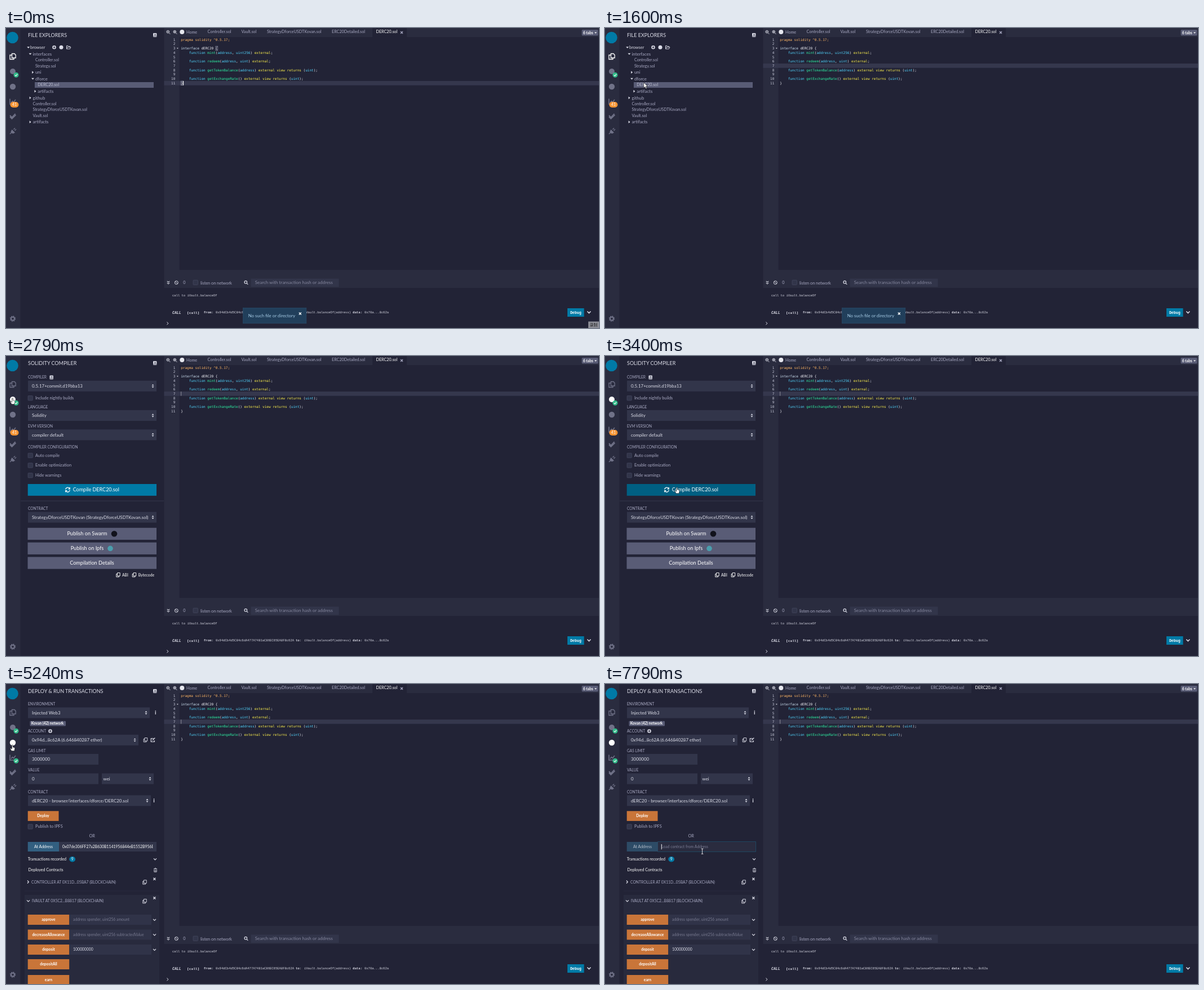
Animation of 1052 by 532 pixels, one loop 8 s. Source, as an HTML page:

```html
<!DOCTYPE html>
<html lang="en">
<head>
<meta charset="utf-8">
<title>Contract editor</title>
<style>
html, body { margin: 0; width: 100%; height: 100%; overflow: hidden; background: #222336; }
svg { display: block; width: 1052px; height: 532px; font-family: Lato, "Open Sans", sans-serif; }
text { white-space: pre; }
.mono { font-family: "Liberation Mono", "DejaVu Sans Mono", monospace; }
.code { font-family: "DejaVu Sans Mono", "Liberation Mono", monospace; }
.cjk { font-family: "Noto Sans CJK SC", "Noto Sans CJK", sans-serif; }
.tab { color: #707288; }
svg[data-tab=files] .files, svg[data-tab=compiler] .compiler, svg[data-tab=deploy] .deploy { color: #fff; }
</style>
</head>
<body>
<svg id="app" viewBox="0 0 1052 532" data-tab="files"></svg>
<script>
const BG = '#222336', BAR = '#2a2c3f', FIELD = '#32354a', GREY = '#595c76', ROW = '#35374d';
const BLUE = '#007aa6', ORANGE = '#c97539', GREEN = '#32ba89';
const TEXT = '#a8a9c2', LIGHT = '#dcdde8', WHITE = '#fff';
const LOOP = 8000;

// Markup helpers; text is placed by its vertical centre.
const box = (x, y, w, h, fill, more = '') =>
  `<rect x="${x}" y="${y}" width="${w}" height="${h}" fill="${fill}" ${more}/>`;
const dot = (x, y, r, fill, more = '') => `<circle cx="${x}" cy="${y}" r="${r}" fill="${fill}" ${more}/>`;
const txt = (x, y, s, size = 7.2, fill = TEXT, more = '') =>
  `<text x="${x}" y="${y + size * 0.35}" font-size="${size}" fill="${fill}" ${more}>${s}</text>`;
const mid = (x, y, s, size, fill = WHITE, more = '') => txt(x, y, s, size, fill, 'text-anchor="middle" ' + more);
const path = (x, y, d, stroke, fill = 'none', width = 1) =>
  `<path transform="translate(${x} ${y})" d="${d}" stroke="${stroke}" fill="${fill}" stroke-width="${width}"/>`;
const group = (id, body, hidden) => `<g id="${id}" ${hidden ? 'display="none"' : ''}>${body}</g>`;
const BOLD = 'font-weight="700"';

const line = {
  down: 'M-2.5-1.2L0 1.3L2.5-1.2', right: 'M-1-2.5L1.3 0L-1 2.5', cross: 'M-2-2L2 2M-2 2L2-2',
  check: 'M-2 0L-.5 1.6L2.2-1.5', copy: 'M-1.5-3.5H3.2V2H-1.5ZM-1.5-1.5H-3.3V3.8H1.5V2',
  plus: 'M-2 0H2M0-2V2', lens: 'M1.3 1.3L3.3 3.3M-3-.8A2.3 2.3 0 1 1 1.6-.8A2.3 2.3 0 1 1-3-.8'
};
const chevron = (x, y, way = 'down') => path(x, y, line[way], LIGHT, 'none', 1.2);
const cross = (x, y, c = LIGHT) => path(x, y, line.cross, c, 'none', 1.3);
const copy = (x, y, c = LIGHT) => path(x, y, line.copy, c, 'none', 0.9);
const fold = (x, y, open) => path(x, y, open ? 'M-2.5-1.3H2.5L0 1.5Z' : 'M-1.3-2.4V2.4L1.6 0Z', 'none', LIGHT);
const book = (x, y) => box(x - 3, y - 3.5, 6.4, 7, LIGHT, 'rx="1"') + path(x, y, 'M-1-1.5H2M-1 .1H2M-2.5 2H3', BG, 'none', 0.7);
const badge = (x, y) => dot(x, y, 4.5, GREEN) + path(x, y, line.check, WHITE, 'none', 1.1);
const plus = (x, y) => dot(x, y, 3.3, LIGHT) + path(x, y, line.plus, BG);
const tick = (x, y) => box(x, y - 4.2, 8.4, 8.4, FIELD, 'stroke="#4b4e66" stroke-width=".6" rx="1"');
const label = (y, s) => txt(39, y, s, 6.6);
const field = (x, y, w, s, h = 19, pad = 7) => box(x, y - h / 2, w, h, FIELD) + txt(x + pad, y, s, 7.9, LIGHT);
const select = (x, y, w, s, pad) => field(x, y, w, s, 19, pad) +
  path(x + w - 6.5, y, 'M-2-.8L0-3.2L2-.8ZM-2 .8L0 3.2L2 .8Z', 'none', LIGHT);
const option = (y, s) => tick(39, y) + txt(52, y - 0.3, s, 7.4);
const title = s => txt(39, 12.5, s, 9, LIGHT) + book(264, 12.5);

function sideBar() {
  const tab = (name, body) => `<g class="tab ${name}" stroke="none" fill="none">${body}</g>`;
  const cur = 'currentColor';
  return box(0, 0, 25.5, 532, BAR) + dot(11.5, 17, 10.3, BLUE) +
    tab('files', path(12, 50.5, 'M-1.5-5H3L5.2-2.7V2.5H-1.5ZM-1.5-2.5H-5V5H2V2.5', cur, 'none', 1.3)) +
    tab('compiler', dot(12, 77, 5, cur)) + badge(18, 83.3) +
    tab('deploy', dot(12, 104, 5.2, cur)) +
    tab('', path(12, 130.5, 'M-5-5V4.5H6M-3 2L-.5-1L1.5 1L5-3.5', cur, 'none', 1.5)) +
    group('warn', box(7.5, 131, 15, 10, '#f79433', 'rx="5"') + mid(15, 136, '41', 7, WHITE)) +
    group('fine', badge(18, 136.3), true) +
    tab('', path(12, 156, 'M-5-1L-1.5 2.5L4.5-4M-5 1.7L-1.5 5L5.5-2', cur, 'none', 1.8)) +
    tab('', path(12, 183, 'M-5 5L-2 2M1.5-3L4-5.5M3.5-1L6-3.5', cur, 'none', 1.4) +
      path(12, 183, 'M-1.5-3L4 2.5L1 4.2L-2.2 3.4L-3.6 1Z', 'none', cur)) +
    `<circle class="tab" cx="12" cy="515.5" r="3" fill="none" stroke="${cur}" stroke-width="2"/>` +
    `<circle class="tab" cx="12" cy="515.5" r="4.5" fill="none" stroke="${cur}" stroke-width="1.4" stroke-dasharray="1.9 1.634"/>`;
}

function filesPanel() {
  const folder = (x, y, s, open) => fold(x - 4.5, y, open) + txt(x, y, s, 7.8);
  return title('FILE EXPLORERS') + box(51, 96, 211, 10, GREY) +
    fold(39.7, 34.5, true) + txt(43, 34.5, 'browser', 7.4, LIGHT) + plus(85.5, 34.3) + dot(98, 34.3, 3.5, LIGHT) +
    path(111, 34.3, 'M-3.5 2.8V-2.8H-1L0-1.6H2.4V-.4M-3.5 2.8L-2-.4H4L2.4 2.8Z', LIGHT, 'none', 0.9) +
    folder(47.5, 46, 'interfaces', true) + txt(52, 56.6, 'Controller.sol') + txt(52, 67.2, 'Strategy.sol') +
    folder(52, 78.6, 'uni') + folder(52, 90, 'dforce', true) + txt(56.3, 100.6, 'DERC20.sol', 7.2, '#bfc1d4') +
    folder(56.3, 112.2, 'artifacts') + folder(47.5, 123.8, 'github') + txt(47.5, 134.2, 'Controller.sol') +
    txt(47.5, 144.6, 'StrategyDforceUSDTKovan.sol') + txt(47.5, 155.2, 'Vault.sol') + folder(47.5, 166.7, 'artifacts');
}

function compilerPanel() {
  const wide = (y, s, x = 152.5) => box(38.5, y - 10.6, 228.5, 21.2, GREY) + mid(x, y - 0.3, s, 9.15);
  return title('SOLIDITY COMPILER') + label(38, 'COMPILER') + book(80.5, 38) +
    select(39, 53.3, 228, '0.5.17+commit.d19bba13') + option(74.6, 'Include nightly builds') +
    label(90.3, 'LANGUAGE') + select(39, 105.5, 228, 'Solidity') +
    label(124.7, 'EVM VERSION') + select(39, 139.8, 228, 'compiler default') +
    label(161.8, 'COMPILER CONFIGURATION') + option(176.4, 'Auto compile') +
    option(194, 'Enable optimization') + option(211.7, 'Hide warnings') +
    box(37.7, 226, 230.3, 23, '#24668a', 'id="ring" display="none" rx="1"') +
    box(38.7, 227, 228.3, 20.8, BLUE, 'id="compile"') + txt(118.7, 237.3, 'Compile DERC20.sol', 9, WHITE) +
    path(109.5, 237.2, 'M-3.8-.6A3.8 3.8 0 0 1 3-2.5M3.8.6A3.8 3.8 0 0 1-3 2.5M3.7-4.2V-1.4H1M-3.7 4.2V1.4H-1', WHITE, 'none', 1.3) +
    box(26, 256.5, 254, 1, '#35384c') + label(270.8, 'CONTRACT') +
    group('old', select(39, 286, 228, 'StrategyDforceUSDTKovan (StrategyDforceUSDTKovan.sol)')) +
    group('new', select(39, 286, 228, 'dERC20 (DERC20.sol)'), true) +
    wide(315.3, 'Publish on Swarm', 144) + dot(192, 315.3, 5.3, '#11121b') +
    wide(341.2, 'Publish on Ipfs', 144) + dot(185, 341.3, 4.8, '#4a9ead') + wide(367, 'Compilation Details') +
    copy(199, 388, WHITE) + txt(206, 388.3, 'ABI', 6.8, WHITE) +
    copy(227.5, 388, WHITE) + txt(234.8, 388.3, 'Bytecode', 6.8, WHITE);
}

function deployPanel() {
  const call = (y, s, arg, fill) => box(38.7, y - 9, 73.5, 18, ORANGE) + mid(75.5, y, s, 6.75, WHITE, BOLD) +
    (arg ? box(112.5, y - 9, 145.5, 18, '#303348') + txt(119, y, arg, 6.83, fill) + chevron(263.5, y) : '');
  const info = (x, y) => mid(x, y, 'i', 10, LIGHT, BOLD);
  return title('DEPLOY &amp; RUN TRANSACTIONS') + label(36, 'ENVIRONMENT') +
    select(39, 51, 216, 'Injected Web3') + info(265.2, 50.5) +
    box(42.5, 65.7, 63.5, 8.8, GREY, 'rx="1"') + txt(44.8, 70, 'Kovan (42) network', 6.6, WHITE, BOLD) +
    label(83.6, 'ACCOUNT') + plus(78.5, 83.5) + select(39, 99.4, 196, '0x94d...8c62A (6.646840287 ether)') +
    copy(247.5, 99) + path(260.8, 99, 'M1-2.5H-3.5V3.5H2.5V1M-1 1L3.5-3.5', LIGHT, 'none', 1.2) +
    label(118.4, 'GAS LIMIT') + field(39, 133.5, 125, '3000000') +
    label(152.7, 'VALUE') + field(39, 168, 125, '0') + select(170, 168, 92, 'wei', 2.5) +
    label(191.5, 'CONTRACT') + select(39, 206.8, 218, 'dERC20 - browser/interfaces/dforce/DERC20.sol') + info(262.5, 206.8) +
    box(38.7, 225.3, 54.8, 17.6, ORANGE) + mid(66, 234, 'Deploy', 6.7, WHITE, BOLD) +
    option(253, 'Publish to IPFS') + mid(152.7, 269.4, 'OR', 7.4, TEXT) +
    box(93, 279, 175, 19, '#1f4660', 'id="focus" display="none" rx="1"') +
    box(94, 280, 173, 17, FIELD, 'id="entry"') + box(38.7, 280, 55.3, 17, '#325f80', 'id="at"') +
    mid(66.5, 288.6, 'At Address', 6.95, WHITE, 'id="atLabel"') +
    box(100, 283.8, 160, 9.8, '#0078d7', 'id="mark" display="none"') +
    `<g id="address" clip-path="url(#clip)">${txt(100, 288.6, '0x07de306FF27a2B630B1141956844eB1552B956E9', 6.85, WHITE)}</g>` +
    group('hint', txt(100, 288.6, 'Load contract from Address', 6.88, '#7b7d94') + box(99.8, 284, 0.9, 9.3, WHITE), true) +
    txt(38.7, 310.8, 'Transactions recorded', 7.1, WHITE) + box(112.3, 306, 10.8, 9.4, BLUE, 'rx="4.7"') +
    mid(117.7, 310.7, '9', 6.8) + chevron(264.5, 310.5) + txt(39.6, 330, 'Deployed Contracts', 7.1, WHITE) +
    path(265, 330, 'M-3-2.4H3M-1-3.3H1M-2.2-1.2V3.2H2.2V-1.2M0-1V3', LIGHT, 'none', 0.9) +
    chevron(39, 351, 'right') + txt(45, 351.5, 'CONTROLLER AT 0X11D...05BA7 (BLOCKCHAIN)', 6.78) +
    copy(246, 351.3) + cross(263.4, 345.8) + box(33, 366.5, 239, 1, '#292b3e') +
    box(33, 374, 239, 158, '#282a3d') + chevron(39.5, 384.5) +
    txt(46, 385, 'IVAULT AT 0X5C2...B8817 (BLOCKCHAIN)', 6.78) + copy(246, 385) + cross(263.4, 379.5) +
    call(418, 'approve', 'address spender, uint256 amount', '#77798f') +
    call(444.5, 'decreaseAllowance', 'address spender, uint256 subtractedValue', '#77798f') +
    call(471, 'deposit', '100000000', LIGHT) + call(497, 'depositAll') + call(525, 'earn');
}

const CODE = `pragma solidity ^0.5.17;

interface dERC20 {
    function mint(address, uint256) external;

    function redeem(address, uint) external;

    function getTokenBalance(address) external view returns (uint);

    function getExchangeRate() external view returns (uint);
}`.split('\n');
const rowY = n => 20.5 + (n - 1) * 7.73;
const paint = s => s.startsWith('pragma') ? `<tspan fill="#ffb765">${s}</tspan>` : s
  .replace(/\b(function|interface|address|uint256|uint|external|view|returns|mint|redeem|get\w+)\b/g, w => {
    const fill = /^(ext|vie|ret)/.test(w) ? '#fff24d' : /^(mint|red|get)/.test(w) ? '#2ff0a4' :
      w === 'interface' ? '#d3e6f6' : '#52d6ff';
    return `<tspan fill="${fill}">${w}</tspan>`;
  });

function editor() {
  const tabs = [[320, 'Home'], [357.5, 'Controller.sol'], [417.5, 'Vault.sol'],
    [463, 'StrategyDforceUSDTKovan.sol'], [578, 'ERC20Detailed.sol']];
  const rows = CODE.map((s, i) => txt(300.3, rowY(i + 1), i + 1, 6.03, '#c6c8d8', 'class="code" text-anchor="end"') +
    (s && txt(310.2, rowY(i + 1), paint(s), 6.03, '#f0f1f7', 'class="code"'))).join('');
  const frame = (x, n) => box(x, rowY(n) - 3.7, 3.8, 7.4, 'none', 'stroke="#8d8fa6" stroke-width=".7"');
  return box(280.5, 0, 771.5, 16, BAR) + box(650, 0, 61, 16, BG) + box(280.5, 16, 27.2, 413, BAR) +
    path(288, 7.5, line.lens + 'M-2-.8H.6', LIGHT, 'none', 1) +
    path(300, 7.5, line.lens + 'M-2-.8H.6M-.7-2V.5', LIGHT, 'none', 1) + dot(312.3, 7, 4, '#e6e7ee') +
    tabs.map(([x, s], i) => txt(x, i ? 6 : 7, s)).join('') + txt(656.5, 6.5, 'DERC20.sol', 7.2, WHITE) + cross(702, 8, TEXT) +
    box(1021.5, 3, 29, 10.5, GREY, 'rx="1.5"') + txt(1023.7, 8.3, '6 tabs', 6.6, WHITE, BOLD) +
    path(1046, 8.5, 'M-2-1H2L0 1.2Z', 'none', WHITE) +
    box(280.5, 0, 771.5, 7.7, ROW, 'id="active"') + rows + path(304.3, rowY(3), 'M-1.5-.8H1.5L0 1Z', 'none', LIGHT) +
    group('pair', frame(371.9, 3) + frame(310.2, 11)) + box(310, 0, 1.2, 7.6, WHITE, 'id="caret"');
}

function terminal() {
  const mono = (x, s, more = '', size = 5.52, y = 504.5) => txt(x, y, s, size, '#d8d9e4', 'class="mono" ' + more);
  return box(280.5, 429, 771.5, 32, BAR) + box(280.5, 461, 771.5, 71, BG) +
    path(288, 451.3, 'M-2.2-2.5L0-.5L2.2-2.5M-2.2.5L0 2.5L2.2.5', LIGHT, 'none', 1.1) +
    path(302.3, 451.5, 'M-3 0A3 3 0 1 1 3 0A3 3 0 1 1-3 0M-2-2L2 2', LIGHT, 'none', 1) +
    txt(314.3, 451.8, '0', 7.3) + tick(332, 451.3) + txt(345, 452, 'listen on network', 7.3) +
    path(426, 451.5, line.lens, LIGHT, 'none', 1.2) + box(434.5, 444.5, 156, 14.5, FIELD) +
    txt(441.8, 451.7, 'Search with transaction hash or address', 7.95, '#85879e') +
    mono(295, 'call to iVault.balanceOf', '', 5.52, 474) +
    mono(295, 'CALL', BOLD + ' font-style="italic"', 6.5) + mono(321, '[call]', BOLD, 6.2) + mono(350.7, 'from:', BOLD, 5.7) +
    mono(372, '0x94dCb4d5C84c6dA477A7481aC86EC65EA8F8c62A') + mono(514, 'to:', BOLD) +
    mono(529, 'iVault.balanceOf(address)') + mono(615, 'data:', BOLD, 5.7) + mono(636, '0x70a...8c62a') +
    box(996, 497, 29.5, 15, BLUE) + mid(1010.8, 504.7, 'Debug', 6.6, WHITE, 'class="mono" ' + BOLD) +
    path(1034.3, 504, 'M-3-1.5L0 1.5L3-1.5', LIGHT, 'none', 1.6) + path(286.5, 523.8, line.right, LIGHT, 'none', 1) +
    group('toast', box(420.3, 496.3, 112.5, 27.5, '#213f5b', 'stroke="#2b4f6e" stroke-width=".6"') +
      txt(429.7, 510.3, 'No such file or directory', 7.9, '#a6cbe5') + cross(521.8, 506.5, WHITE)) +
    group('rec', box(1033, 520.5, 19, 11.5, '#8c8d96') + txt(1035.5, 527, '录制', 7, '#222', 'class="cjk"'));
}

const pointers = {
  arrow: path(0, 0, 'M0 0V9.4L2.2 7.4L3.8 10.8L5.3 10.1L3.8 6.8H6.8Z', '#111', WHITE, 0.6),
  hand: path(0, 0, 'M-.9 0Q0-.8.9 0V3.6L3.9 4.5Q4.6 5 4.4 6.2L3.6 10.4H-1.4L-3.7 6.6Q-3.8 5.3-2.4 5.8L-.9 7Z', '#111', WHITE, 0.6),
  beam: path(0, 0, 'M-1.8-4.6H1.8M0-4.6V4.6M-1.8 4.6H1.8', '#e9e9ee', 'none', 0.9)
};
const app = document.getElementById('app');
app.innerHTML = '<clipPath id="clip"><rect x="99" y="280" width="161.5" height="17"/></clipPath>' +
  box(0, 0, 1052, 532, BG) + sideBar() + group('files', filesPanel()) + group('compiler', compilerPanel(), true) +
  group('deploy', deployPanel(), true) + editor() + terminal() +
  group('mouse', Object.entries(pointers).map(([k, s]) => group(k, s, true)).join(''));

// Pointer route: time, x, y, shape held until the next stop.
const route = [
  [30, 1040, 522, 'arrow'], [330, 830, 380, 'beam'], [820, 470, 68, 'beam'], [1000, 462, 67, 'beam'],
  [1300, 281, 84, 'arrow'], [1600, 68.8, 96.8, 'arrow'], [1900, 70, 96, 'arrow'], [2250, 65.7, 86, 'arrow'],
  [2500, 11, 76, 'hand'], [2800, 11.5, 75, 'hand'], [2880, 26, 90, 'arrow'], [3330, 125, 229, 'hand'],
  [3400, 127.7, 233.3, 'hand'], [3750, 127.7, 233.3, 'hand'], [3860, 110, 224, 'arrow'], [4270, 48.5, 186, 'arrow'],
  [4520, 11, 118, 'hand'], [4660, 11.5, 112, 'hand'], [4760, 11.3, 108.3, 'hand'], [5280, 11.3, 108.3, 'arrow'],
  [5590, 117, 257.5, 'arrow'], [5740, 117, 259, 'arrow'], [5900, 113, 281, 'beam'], [6030, 111, 290, 'beam'],
  [6890, 111, 290, 'beam'], [7080, 172.6, 296.7, 'beam'], [LOOP, 172.6, 296.7, 'beam']
];
const $ = id => document.getElementById(id);
const show = (id, on) => $(id).setAttribute('display', on ? 'inline' : 'none');
const put = (id, key, value) => $(id).setAttribute(key, value);

function movePointer(t) {
  const i = route.findIndex(k => k[0] > t);
  show('mouse', i > 0);
  if (i < 1) return;
  const [t0, x0, y0, shape] = route[i - 1], [t1, x1, y1] = route[i];
  const k = (t - t0) / (t1 - t0);
  put('mouse', 'transform', `translate(${x0 + (x1 - x0) * k} ${y0 + (y1 - y0) * k})`);
  for (const name in pointers) show(name, name === shape);
}

function draw(t) {
  const tab = t < 2690 ? 'files' : t < 5090 ? 'compiler' : 'deploy';
  app.dataset.tab = tab;
  for (const name of ['files', 'compiler', 'deploy']) show(name, name === tab);

  const clicked = t >= 950, row = clicked ? 7 : 11;
  put('active', 'y', rowY(row) - 3.85);
  put('caret', 'y', rowY(row) - 3.85);
  put('caret', 'x', clicked ? 310 : 313.9);
  const blurred = t >= 2690;
  const lit = clicked ? (t - 950) % 1000 < 500 : (t + 200) % 1000 < 500;
  put('caret', 'opacity', blurred ? 0.35 : lit ? 1 : 0);
  show('pair', !clicked);
  show('rec', t < 80);

  const slide = Math.min(1, Math.max(0, (t - 1750) / 300));
  put('toast', 'transform', `translate(0 ${slide * slide * 40})`);
  show('toast', slide < 1);

  put('compile', 'fill', t >= 3330 && t < 3860 ? '#005f82' : BLUE);
  show('ring', t >= 3520);
  show('old', t < 3850);
  show('new', t >= 3850);
  show('warn', t < 4000);
  show('fine', t >= 4000);

  const focused = t >= 6490, cleared = t >= 7690;
  show('focus', focused);
  put('entry', 'fill', focused ? '#2a2c3f' : FIELD);
  show('mark', t >= 6640 && !cleared);
  show('address', !cleared);
  show('hint', cleared);
  put('at', 'fill', cleared ? '#2d4b66' : '#325f80');
  put('atLabel', 'fill', cleared ? '#b7bfcb' : WHITE);
  movePointer(t);
}

const start = performance.now();
function loop() {
  draw((performance.now() - start) % LOOP);
  requestAnimationFrame(loop);
}
loop();
</script>
</body>
</html>
```
